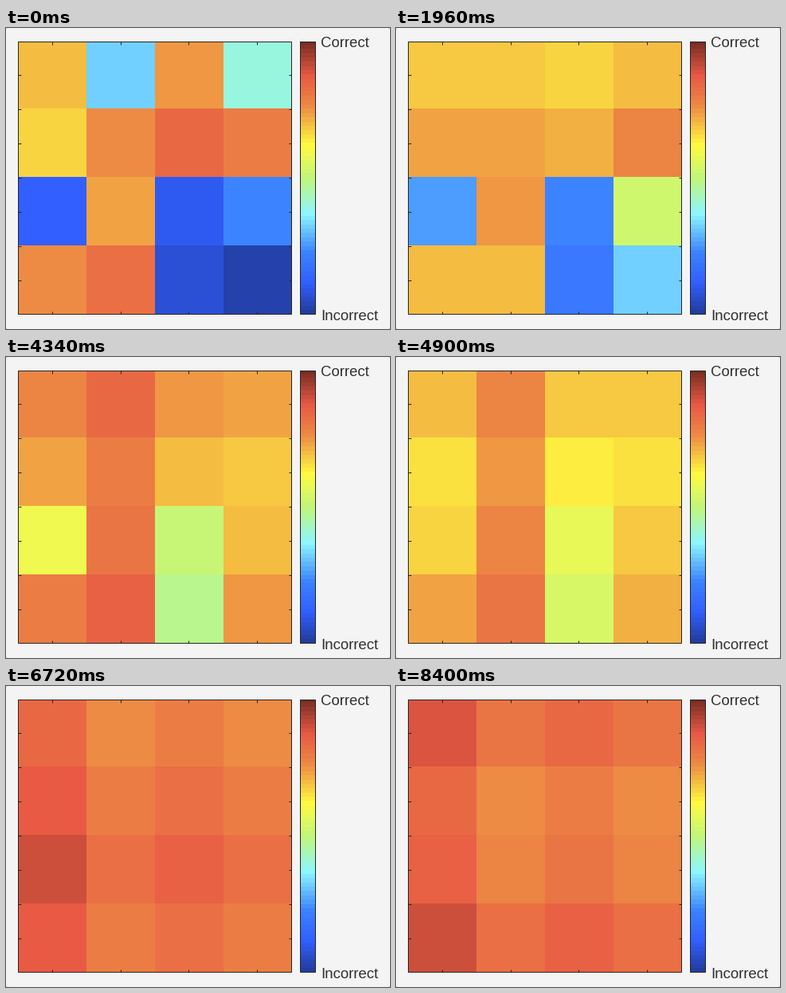
A matplotlib script that plays this animation: 482x378 px, repeating every 8.54 s.

```python
import numpy as np
import matplotlib.pyplot as plt
from matplotlib.animation import FuncAnimation
from matplotlib.colors import LinearSegmentedColormap
from matplotlib.patches import FancyBboxPatch, Rectangle

W, H = 482, 378
FRAMES, INTERVAL = 122, 70
BEAT = 6.9  # frames between two updates of the map
INK = "#262626"
LEFT, RIGHT, TOP, BOTTOM = 15, 358, 16.6, 359.4
BAR_LEFT, BAR_RIGHT = 369, 388

# Colour ramp over levels 0-63
STOPS = {0: "#233d9e", 7: "#325fff", 14: "#3c83ff", 23: "#8cf7ff", 31: "#c0f67e",
         39: "#fffa40", 48: "#ed8b44", 55: "#e85a44", 63: "#782e24"}
CMAP = LinearSegmentedColormap.from_list(
    "scores", [(level / 63, color) for level, color in STOPS.items()], N=64)

START = np.array([[44, 20, 47, 25], [42, 48, 53, 50], [7, 46, 6, 14], [48, 52, 4, 1]])
SPEED = np.array([1.1, 2.9, 0.95, 2.4])  # how fast each column learns
# Highest level of each column at a few updates
CEILING = {0: [56, 56, 56, 56], 4: [45, 45, 44, 48], 9: [48, 52, 46, 45],
           12: [35, 43, 36, 39], 14: [55, 50, 52, 50]}


def scores(step):
    """Each cell climbs from its start until it meets its column's ceiling."""
    climb = START + SPEED * step ** 1.5
    top = [np.interp(step, list(CEILING), col) for col in zip(*CEILING.values())]
    crest = 2.6 + 0.8 * np.cos(2 * np.pi * (step - 17.5) / 9)
    ripple = 2.2 * np.cos(np.pi / 2 * (np.arange(4) - crest))
    return np.round(np.minimum(climb, np.add.outer(ripple, top)))


fig = plt.figure(figsize=(W / 72, H / 72), dpi=72, facecolor="#d4d4d4")
ax = fig.add_axes([0, 0, 1, 1])
ax.axis("off")


def panel(data, x0, x1):
    """Colour cells inside a thin dark box."""
    box = Rectangle((x0, TOP), x1 - x0, BOTTOM - TOP, fill=False, ec=INK, lw=1, zorder=3)
    ax.add_patch(box)
    image = ax.imshow(data, cmap=CMAP, vmin=-0.5, vmax=63.5, aspect="auto",
                      interpolation="nearest", extent=(x0, x1 + 1, 360, 16), zorder=1)
    image.set_clip_path(box)
    return image


def tick(xs, ys):
    ax.plot(xs, ys, color=INK, lw=1, solid_capstyle="butt", zorder=3)


ax.add_patch(FancyBboxPatch((0, 0), W, H, fc="#f4f4f4", ec="none", zorder=0,
                            boxstyle="round,pad=0,rounding_size=4"))
heat = panel(scores(0), LEFT, RIGHT)
panel(np.arange(64)[::-1, None], BAR_LEFT, BAR_RIGHT)

for k in range(1, 8):
    y = TOP + (BOTTOM - TOP) * k / 8
    tick([LEFT, LEFT + 4], [y, y])
    tick([RIGHT - 3, RIGHT], [y, y])
    if k % 2:
        x = LEFT + (RIGHT - LEFT) * k / 8
        tick([x, x], [TOP, TOP + 4])
        tick([x, x], [BOTTOM - 3, BOTTOM])

for label, y in (("Correct", 24.3), ("Incorrect", 367.3)):
    ax.text(395, y, label, family="Liberation Sans", size=18.6, color="#303030",
            ha="left", va="baseline")

ax.set_xlim(0, W)
ax.set_ylim(H, 0)


def update(frame):
    heat.set_data(scores(int((frame + 1.9) / BEAT)))
    return [heat]


anim = FuncAnimation(fig, update, frames=FRAMES, interval=INTERVAL,
                     repeat=True, repeat_delay=0)
plt.show()
```
